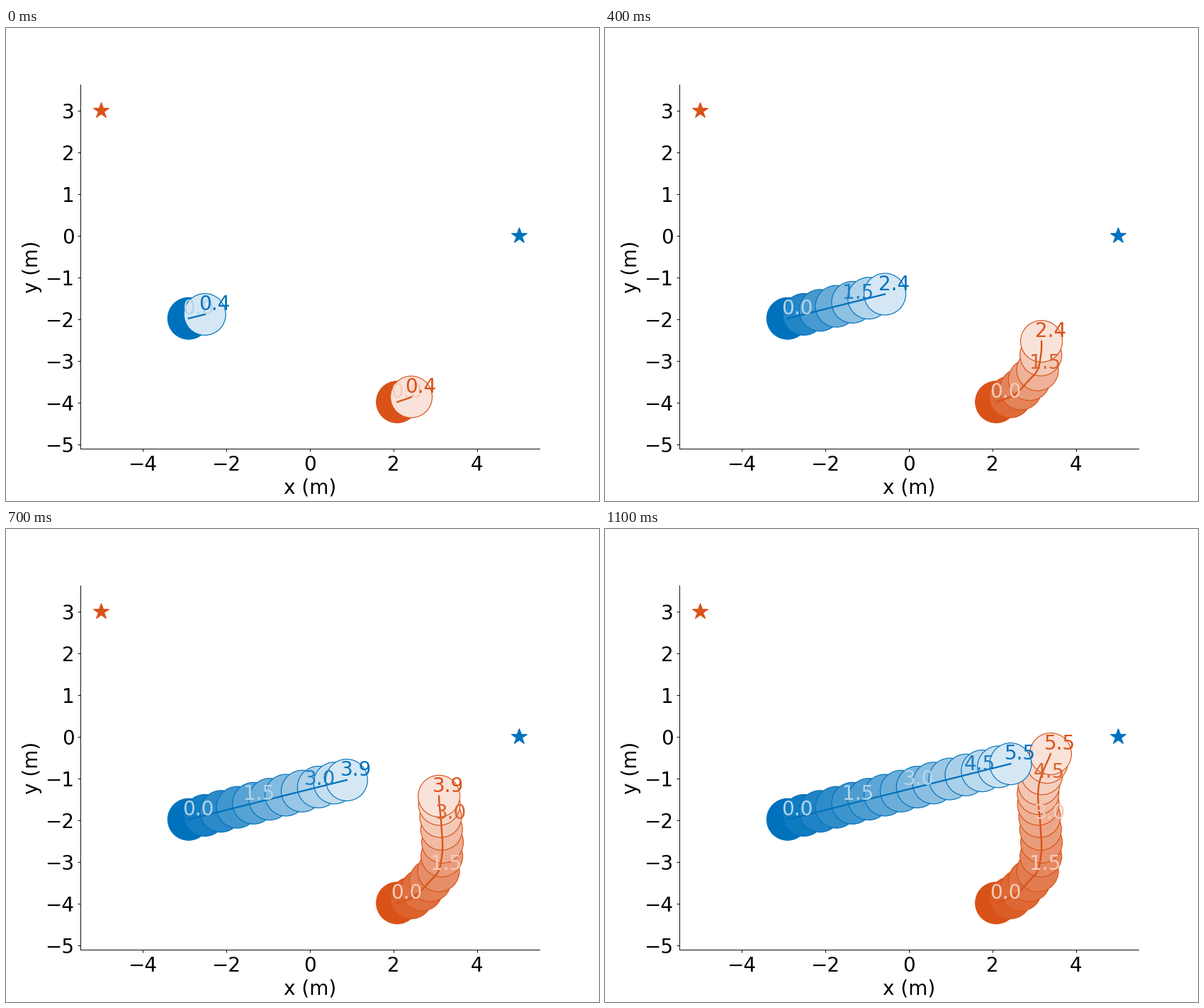
Write a matplotlib script that moves like this. It is 837x669 px and loops after 2100 ms.

```python
import numpy as np
import matplotlib.pyplot as plt
from matplotlib.animation import FuncAnimation

W, H, DPI = 837, 669, 83.7
ORANGE = np.array([0.85, 0.325, 0.098])
BLUE = np.array([0.0, 0.447, 0.741])
RADIUS = 0.5
STEP = 0.1
END = 5.5
FADE = 1.2

plt.rcParams.update({"font.family": "DejaVu Sans", "font.size": 24})


def smooth(t, knots, values):
    """Cubic curve through a few key points."""
    slope = np.gradient(values, knots)
    i = np.clip(np.searchsorted(knots, t, side="right") - 1, 0, len(knots) - 2)
    h = knots[i + 1] - knots[i]
    u = (t - knots[i]) / h
    return ((1 + 2 * u) * (1 - u) ** 2 * values[i]
            + u * (1 - u) ** 2 * h * slope[i]
            + u ** 2 * (3 - 2 * u) * values[i + 1]
            + u ** 2 * (u - 1) * h * slope[i + 1])


def turning(t):
    """Bend from heading right to heading up, then give way to the right."""
    knots = np.array([0, 0.4, 1.2, 1.6, 2.0, 2.9, 3.9, 4.5, 5.5])
    x = np.array([2.09, 2.427, 2.883, 3.08, 3.158, 3.148, 3.09, 3.125, 3.392])
    y = np.array([-3.98, -3.858, -3.446, -3.212, -2.854, -2.138, -1.416,
                  -1.075, -0.402])
    return np.column_stack([smooth(t, knots, x), smooth(t, knots, y)])


def straight(t):
    """Unit speed from the start straight to the goal."""
    start, goal = np.array([-3.0, -2.0]), np.array([5.0, 0.0])
    heading = (goal - start) / np.linalg.norm(goal - start)
    return start + np.outer(t + STEP, heading)


times = np.arange(round(END / STEP) + 1) * STEP
agents = [(turning(times), (-5, 3), ORANGE), (straight(times), (5, 0), BLUE)]

fig = plt.figure(figsize=((W + 1e-4) / DPI, (H + 1e-4) / DPI), dpi=DPI,
                 facecolor="white")
ax = fig.add_subplot()
ax.set_xlim(-5.5, 5.5)
ax.set_ylim(-5.107, 3.629)
ax.set_xticks(range(-4, 5, 2))
ax.set_yticks(range(-5, 4))
ax.set_xlabel("x (m)")
ax.set_ylabel("y (m)")
ax.spines[["top", "right"]].set_visible(False)
for _, goal, color in agents:
    ax.plot(*goal, color=color, marker="*", markersize=20)

moving = []


def tint(color, alpha):
    return alpha * color + (1 - alpha)


def add_circle(pos, face, edge):
    moving.append(ax.add_patch(plt.Circle(pos, RADIUS, fc=face, ec=edge, lw=1)))


def add_time(pos, t, color):
    moving.append(ax.text(pos[0] - 0.15, pos[1] + 0.1, f"{t:.1f}", color=color))


def marks(spacing, now):
    """Times before now at a fixed spacing, with their step index."""
    for t in np.arange(0, now - 1e-6, spacing):
        yield t, round(t / STEP)


def clear():
    while moving:
        moving.pop().remove()


def draw(frame):
    clear()
    now = min(0.4 + 0.5 * frame, END)
    last = round(now / STEP)
    for path, _, color in agents:
        moving.extend(ax.plot(*path[:last + 1].T, color=color, lw=2))
        for t, i in marks(0.4, now):
            add_circle(path[i], tint(color, 1 - t / (FADE * now)), color)
        for t, i in marks(1.5, now):
            strong = t / (FADE * now) >= 0.5
            add_time(path[i], t, tint(color, 0.9 if strong else 0.3))
        add_circle(path[last], tint(color, 1 - 1 / FADE), color)
        add_time(path[last], now, color)
    return moving


def init():
    return draw(0)


anim = FuncAnimation(fig, draw, frames=21, interval=100, init_func=init,
                     repeat=True, repeat_delay=0, blit=False)
plt.show()
```
